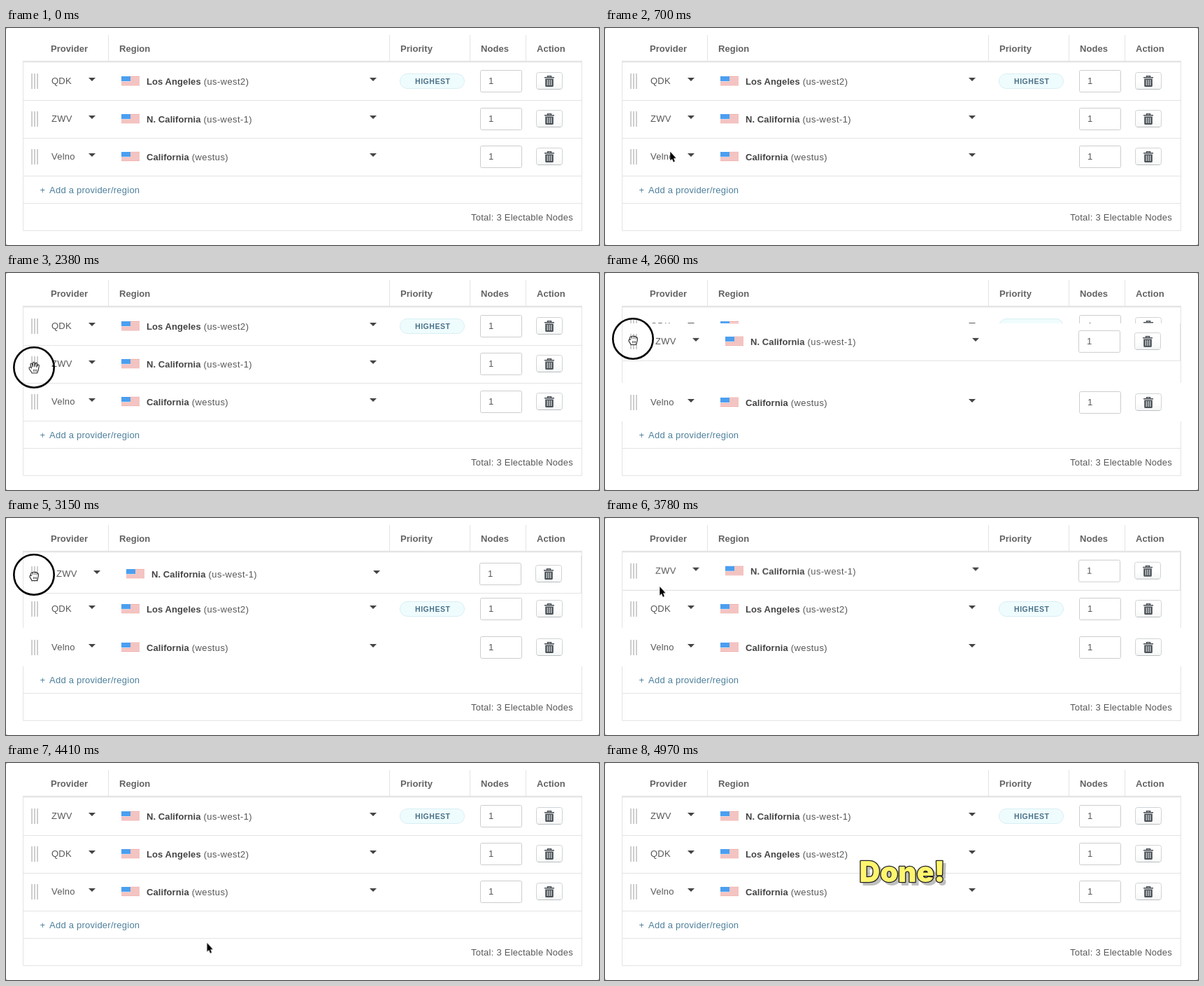
Write an HTML page that moves like this. It is 848 by 310 pixels and loops after 5.04 s.

```html
<!DOCTYPE html>
<html lang="en">
<head>
<meta charset="utf-8">
<title>Reorder regions</title>
<style>
  html, body { margin: 0; width: 100%; height: 100%; overflow: hidden; background: #aaa; }
  svg { display: block; width: 848px; height: 310px; background: #fff; border-radius: 3px; }
  text { font: 13px "Liberation Sans", Arial, sans-serif; letter-spacing: .24px; fill: #585858; }
  .region { letter-spacing: .4px; }
  .b { font-weight: bold; letter-spacing: .08px; fill: #444; }
  .head text { font-weight: bold; letter-spacing: .05px; fill: #626262; }
  .line { stroke: #e4e4e4; fill: none; }
  .link { fill: #4d7f9b; }
  .tag { font-weight: bold; font-size: 10.5px; letter-spacing: .55px; fill: #4a7189; }
  .done { font: 900 41px Inter, "Open Sans", sans-serif; letter-spacing: 0; text-anchor: middle; }

  .mask, .panel, .shift, .first, .third, .pill, .arrow, .grab, .ring, .open, .fist, .second, .pop {
    animation: 5040ms linear infinite;
  }
  .mask, .panel { animation-name: dragging; animation-timing-function: step-end; }
  .shift { animation-name: shift; animation-timing-function: step-end; }
  .first { animation-name: first; animation-timing-function: step-end; }
  .third { animation-name: third; animation-timing-function: step-end; }
  .pill { animation-name: pill; animation-timing-function: step-end; }
  .second { animation-name: drag; }
  .arrow { animation-name: arrow; }
  .grab { animation-name: grab; }
  .ring { animation-name: ring; animation-timing-function: step-end; }
  .open { animation-name: open; animation-timing-function: step-end; }
  .fist { animation-name: fist; animation-timing-function: step-end; }
  .pop { animation-name: pop; transform-origin: 426px 156px; }

  @keyframes dragging {
    0%, 84.7%, 100% { opacity: 0; }
    48.6% { opacity: 1; }
  }
  @keyframes shift {
    0%, 84.7%, 100% { transform: none; }
    48.6% { transform: translateX(var(--d)); }
  }
  @keyframes first {
    0% { transform: none; }
    54.1%, 100% { transform: translateY(54px); }
  }
  @keyframes third {
    0%, 84.7%, 100% { transform: none; }
    48.6% { transform: translateY(1px); }
  }
  @keyframes pill {
    0%, 84.7%, 100% { transform: none; }
    54.1% { transform: translateY(54px); }
  }
  @keyframes drag {
    0%, 47.22% { transform: translateY(0); }
    50% { transform: translateY(-9px); }
    52.78% { transform: translateY(-32px); }
    54.17% { transform: translateY(-42px); }
    56.94%, 59.72% { transform: translateY(-49px); }
    62.5% { transform: translateY(-50px); }
    65.28%, 72.22% { transform: translateY(-51px); }
    76.39%, 84.69% { transform: translateY(-56px); }
    84.7%, 100% { transform: translateY(-54px); }
  }
  @keyframes arrow {
    0%, 6.92% { opacity: 0; transform: translate(339px, 251px); }
    6.93% { opacity: 1; transform: translate(339px, 251px); }
    11.11% { transform: translate(172px, 214px); }
    16.67% { transform: translate(15px, 139px); }
    19.44% { transform: translate(1px, 115px); }
    22.22%, 25% { transform: translate(13px, 135px); }
    26.39% { transform: translate(15px, 135px); }
    30.56% { transform: translate(36px, 129px); }
    33.3% { opacity: 1; transform: translate(36px, 129px); }
    33.31%, 73.57% { opacity: 0; transform: translate(38px, 80px); }
    73.58% { opacity: 1; transform: translate(40px, 82px); }
    80.56% { transform: translate(224px, 157px); }
    83.33% { transform: translate(264px, 200px); }
    91.64% { opacity: 1; transform: translate(310px, 312px); }
    91.65%, 100% { opacity: 0; transform: translate(310px, 312px); }
  }
  @keyframes grab {
    0%, 47.22% { transform: translate(40px, 135px); }
    50% { transform: translate(40px, 119px); }
    52.78% { transform: translate(40px, 94px); }
    54.17% { transform: translate(40px, 87px); }
    56.94%, 62.5% { transform: translate(40px, 81px); }
    65.28%, 100% { transform: translate(40px, 80px); }
  }
  @keyframes ring {
    0%, 73.58%, 100% { opacity: 0; }
    47.2% { opacity: 1; }
  }
  @keyframes open {
    0%, 48.6%, 100% { opacity: 0; }
    33.3% { opacity: 1; }
  }
  @keyframes fist {
    0%, 73.58%, 100% { opacity: 0; }
    48.6% { opacity: 1; }
  }
  @keyframes pop {
    0%, 94.41% { opacity: 0; transform: scale(5.2); }
    94.42% { opacity: .3; transform: scale(5.2); animation-timing-function: ease-out; }
    98.6%, 100% { opacity: 1; transform: none; }
  }
</style>
</head>
<body>
<svg viewBox="0 0 848 310" xmlns="http://www.w3.org/2000/svg">
  <defs>
    <linearGradient id="face" x2="0" y2="1">
      <stop offset=".5" stop-color="#fff"/>
      <stop offset="1" stop-color="#f5f6f6"/>
    </linearGradient>
    <path id="caret" d="M-5 71H5L0 76Z" fill="#444"/>
    <path id="handle" d="M37 65V87M41 65V87M45 65V87" stroke="#c6c6c6" stroke-width="1.7"/>
    <g id="flag">
      <rect x="165" y="69" width="26" height="13" fill="#fbf1f1"/>
      <path d="M165 69.5h26m-26 2h26m-26 2h26m-26 2h26m-26 2h26m-26 2h26m-26 2h26" stroke="#ec9792"/>
      <rect x="165" y="69" width="13" height="7" fill="#4b9ff0"/>
    </g>
    <g id="tools">
      <rect x="678.5" y="60.5" width="59" height="31" rx="2" fill="#fff" stroke="#cdcdcd"/>
      <text x="690" y="80">1</text>
      <rect x="758.5" y="63.5" width="37" height="24" rx="3" fill="url(#face)" stroke="#cfd3d5"/>
      <path d="M761 87.5H793" stroke="#b9bfc2"/>
      <path d="M770 70.8H784M774.5 70.5V68.8H779.5V70.5" fill="none" stroke="#4a5157" stroke-width="1.5"/>
      <path d="M771.2 72.5H782.8V82.5Q782.8 84 781.3 84H772.7Q771.2 84 771.2 82.5Z" fill="#4a5157"/>
      <path d="M774.2 74V82M777 74V82M779.8 74V82" stroke="#eceeef" stroke-width="1.1"/>
    </g>
  </defs>

  <g class="head">
    <text x="64" y="34">Provider</text>
    <text x="162" y="34">Region</text>
    <text x="564" y="34">Priority</text>
    <text x="679" y="34">Nodes</text>
    <text x="759" y="34">Action</text>
    <path class="line" d="M146.5 10V47M548.5 10V47M663.5 10V47M743.5 10V47"/>
  </g>
  <path d="M24 48H824" stroke="#e4e4e4" stroke-width="2.4"/>
  <path class="line" d="M24.5 48V289.5H823.5V48M24 103.5H824M24 157.5H824M24 211.5H824M24 250.5H824"/>
  <rect class="mask" x="22" y="157" width="804" height="55" fill="#fff"/>

  <text class="link" y="236"><tspan x="48.5">+</tspan><tspan x="62">Add a provider/region</tspan></text>
  <text x="811" y="275" text-anchor="end">Total: 3 Electable Nodes</text>

  <g class="third">
    <g transform="translate(0 108)">
      <use href="#handle"/>
      <text x="65" y="80">Velno</text>
      <use href="#caret" x="123"/>
      <use href="#flag"/>
      <text class="region" x="201" y="81"><tspan class="b">California</tspan> (westus)</text>
      <use href="#caret" x="525"/>
      <use href="#tools"/>
    </g>
  </g>

  <g class="first">
    <use href="#handle"/>
    <text x="65" y="80">QDK</text>
    <use href="#caret" x="123"/>
    <use href="#flag"/>
    <text class="region" x="201" y="81"><tspan class="b">Los Angeles</tspan> (us-west2)</text>
    <use href="#caret" x="525"/>
    <use href="#tools"/>
  </g>

  <g class="pill">
    <rect x="563.5" y="65.5" width="92" height="21" rx="10.5" fill="#effcfe" stroke="#d8eef3"/>
    <text class="tag" x="585" y="80">HIGHEST</text>
  </g>

  <g class="second">
    <g class="panel">
      <rect x="24" y="104" width="799" height="54" fill="#fff"/>
      <path class="line" d="M24.5 104V157.5H822.5V104"/>
    </g>
    <g transform="translate(0 54)">
      <use href="#handle"/>
      <g class="shift" style="--d:7px">
        <text x="65" y="80">ZWV</text>
        <use href="#caret" x="123"/>
        <use href="#flag"/>
        <text class="region" x="201" y="81"><tspan class="b">N. California</tspan> (us-west-1)</text>
      </g>
      <g class="shift" style="--d:5px"><use href="#caret" x="525"/></g>
      <g class="shift" style="--d:-1px"><use href="#tools"/></g>
    </g>
  </g>

  <g class="grab">
    <circle class="ring" r="28.7" fill="none" stroke="#000" stroke-width="2.6"/>
    <g fill="#fff" stroke="#222" stroke-width="1.1" stroke-linejoin="round" stroke-linecap="round">
      <g class="open">
        <path d="M-3 8C-4 5-7 3-7 1C-7-1-5-1-3.5 1L-5-4C-5.2-6-3-6.5-2.5-4.5L-1.8-1L-1.6-6C-1.5-8 .8-8 .9-6L1-1L2-5.5C2.5-7.3 4.5-6.8 4.3-5L3.8-.5L5-3C6-4.5 7.8-3.8 7.3-2C6.5 2 6.5 4 4.5 8Z"/>
        <path d="M-.5 3V5.5M1.5 3V5.5M3.5 3V5.5" fill="none" stroke-width=".8"/>
      </g>
      <g class="fist">
        <path d="M-3 8.5C-3.5 6-6 5-6 2.5C-6 .5-4.5 .5-3.8 1.5C-5.5-2.5-3.5-4-1.8-2.5C-1.2-4.5 1-4.5 1.4-2.8C2.2-4.2 4-3.8 4.2-2C6-2.6 6.8-1.2 6.4 1C6 4.5 5 6 4.5 8.5Z"/>
        <path d="M-1.5-2V0M1.4-2V0M4.2-1.5V.3M-.5 3.5V6M1.5 3.5V6M3.5 3.5V6" fill="none" stroke-width=".8"/>
      </g>
    </g>
  </g>

  <path class="arrow" d="M.3 .5V13L3 10.5L4.9 15.2L6.9 14.3L5 9.7H8.6Z" fill="#000" stroke="#fff" stroke-width=".6" paint-order="stroke"/>

  <g class="pop">
    <text class="done" x="429" y="173.5" style="fill:#000;stroke:#000;stroke-width:2px;opacity:.25">Done!</text>
    <text class="done" x="425" y="169.5" style="fill:#fff56e;stroke:#222;stroke-width:2.6px;paint-order:stroke;stroke-linejoin:round">Done!</text>
  </g>
</svg>
</body>
</html>
```
